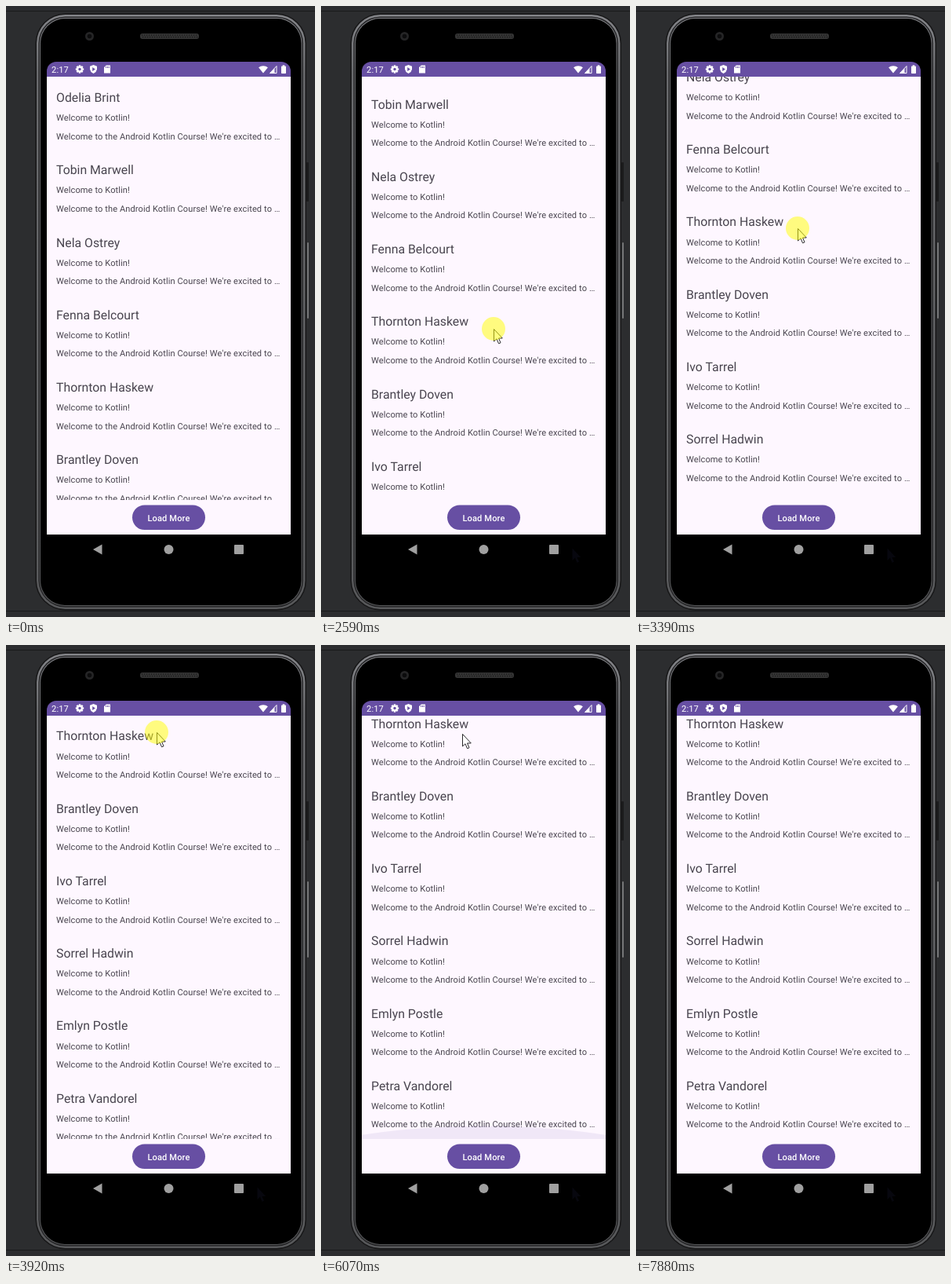
Write an HTML page with a canvas that moves like this. It is 394 px wide and 778 px high and loops after 9.35 s.

```html
<!DOCTYPE html>
<html lang="en">
<head>
<meta charset="utf-8">
<title>Message list</title>
<style>
html, body { margin: 0; width: 100%; height: 100%; overflow: hidden; background: #2c2d2f; }
canvas { display: block; width: 394px; height: 778px; }
</style>
</head>
<body>
<canvas id="stage" width="394" height="778"></canvas>
<script>
const ctx = document.getElementById('stage').getContext('2d');
const LOOP = 9350;
const TICK = 66.8;
const PURPLE = '#674fa3';
const PAPER = '#fef7ff';
const INK = '#49454f';
const ROW = 92.25;
const names = ['Odelia Brint', 'Tobin Marwell', 'Nela Ostrey', 'Fenna Belcourt', 'Thornton Haskew',
  'Brantley Doven', 'Ivo Tarrel', 'Sorrel Hadwin', 'Emlyn Postle', 'Petra Vandorel'];

const smooth = u => u * u * (3 - 2 * u);
const settle = u => 1 - (1 - u) ** 1.5;
const between = (t, a, b) => t >= a && t < b;
const progress = (t, a, b) => Math.min(1, Math.max(0, (t - a) / (b - a)));

// Runs a value through successive moves, each starting where the last one ended.
function glide(t, start, moves) {
  return moves.reduce((value, { from, to, goal, ease }) =>
    value + (goal - value) * ease(progress(t, from, to)), start);
}

const move = (from, to, goal, ease = smooth) => ({ from, to, goal, ease });

const route = [
  { from: 320, to: 520, x: 232, y: 514, ease: settle },
  { from: 2320, to: 3000, x: 209, y: 322, ease: settle },
  { from: 3120, to: 4230, x: 188, y: 64, ease: smooth },
  { from: 4700, to: 5190, x: 178, y: 352, ease: smooth },
  { from: 5330, to: 5800, x: 180, y: 113, ease: settle },
  { from: 6100, to: 6400, x: 199, y: 153, ease: smooth },
  { from: 7560, to: 7830, x: 232, y: 745, ease: smooth }
];
const along = axis => route.map(leg => ({ ...leg, goal: leg[axis] }));
const routeX = along('x'), routeY = along('y');
const scrolling = [move(2360, 3000, 171, settle), move(3131, 4086, 385.4)];

const pointerShown = t => between(t, 315, 7860);
const pressed = t => between(t, 2120, 4500) || between(t, 5320, 5840);

// Overscroll glow: swells while pulled, recedes after release.
const glowAmount = t =>
  Math.sin(progress(t, 5400, 5840) * Math.PI / 2) * (1 - progress(t, 5840, 6440)) ** 2;

function rounded(x, y, w, h, r, fill) {
  ctx.beginPath();
  ctx.roundRect(x, y, w, h, r);
  ctx.fillStyle = fill;
  ctx.fill();
}

function rect(x, y, w, h, fill) {
  ctx.fillStyle = fill;
  ctx.fillRect(x, y, w, h);
}

function disc(x, y, r, fill) {
  ctx.beginPath();
  ctx.arc(x, y, r, 0, Math.PI * 2);
  ctx.fillStyle = fill;
  ctx.fill();
}

function shape(x, y, points, fill, stroke) {
  ctx.beginPath();
  points.forEach(([px, py]) => ctx.lineTo(x + px, y + py));
  ctx.closePath();
  ctx.fillStyle = fill;
  ctx.fill();
  if (stroke) { ctx.strokeStyle = stroke; ctx.lineWidth = 1; ctx.stroke(); }
}

function text(str, x, y, size, color, weight = 400, spacing = 0) {
  ctx.font = `${weight} ${size}px Roboto, sans-serif`;
  ctx.letterSpacing = spacing + 'px';
  ctx.textRendering = 'geometricPrecision';
  ctx.fillStyle = color;
  ctx.fillText(str, x, y);
}

function shell(inset, fill) {
  rounded(37.5 + inset, 9.5 + inset, 345.5 - 2 * inset, 760 - 2 * inset, 38 - inset, fill);
}

function drawPhone() {
  rect(0, 0, 394, 778, '#2c2d2f');
  rect(0, 6, 394, 1, '#191a1b');
  rect(0, 770, 394, 1, '#191a1b');
  rounded(383, 199, 3, 50, 1, '#1b1b1c');
  rounded(384, 301, 2, 97, 1, '#747576');

  const metal = ctx.createLinearGradient(0, 10, 0, 769);
  metal.addColorStop(0, '#85868a');
  metal.addColorStop(0.1, '#6a6b6e');
  metal.addColorStop(1, '#58595b');
  shell(0, '#161617');
  shell(1.5, metal);
  shell(4, '#242426');
  shell(5.5, metal);
  shell(6.5, '#000');

  disc(106.5, 38.5, 5.5, '#252526');
  disc(106.5, 38.5, 2.8, '#0c0c0d');
  rounded(171, 35, 75, 7, 3, '#343434');
  for (let x = 173; x < 245; x += 3) {
    for (let k = 0; k < 2; k++) rect(x + k, 36.5 + k * 2.5, 1.2, 1.2, '#171717');
  }
}

function drawStatus() {
  rounded(52, 71, 311, 19, [12, 12, 0, 0], PURPLE);
  text('2:17', 58, 85, 11.1, '#fff', 400, 0.15);

  for (let i = 0; i < 8; i++) {
    ctx.save();
    ctx.translate(94, 80.5);
    ctx.rotate(i * Math.PI / 4);
    rect(-1.2, -5.2, 2.4, 3, '#fff');
    ctx.restore();
  }
  disc(94, 80.5, 3.9, '#fff');
  disc(94, 80.5, 1.7, PURPLE);

  shape(111.5, 80.5, [[0, -5.5], [4.5, -3.8], [4.5, 0], [3, 3.5], [0, 5.5], [-3, 3.5], [-4.5, 0], [-4.5, -3.8]], '#fff');
  shape(111.5, 80.5, [[-1.3, -2.4], [2.4, 0], [-1.3, 2.4]], PURPLE);

  shape(129, 80.5, [[-1.2, -5], [4, -5], [4, 5], [-4, 5], [-4, -2.2]], '#fff');
  for (let i = 0; i < 3; i++) rect(127.2 + i * 1.8, 77, 0.9, 2, PURPLE);

  ctx.beginPath();
  ctx.moveTo(328, 85.5);
  ctx.arc(328, 85.5, 9.3, -Math.PI * 0.72, -Math.PI * 0.28);
  ctx.fillStyle = '#fff';
  ctx.fill();
  shape(336.5, 85.5, [[0, 0], [8.5, 0], [8.5, -9]], 'transparent', '#fff');
  shape(336.5, 85.5, [[0, 0], [6, 0], [6, -6.3]], '#fff');
  rounded(351, 76.5, 6, 9.5, 0.8, '#fff');
  rect(352.7, 75.3, 2.6, 1.5, '#fff');
}

function drawGlow(amount) {
  ctx.save();
  ctx.globalAlpha = 0.15 * Math.sqrt(amount);
  ctx.translate(207.5, 629);
  ctx.scale(1, -0.84 * amount);
  disc(0, 50 - 373, 373, '#6750a4');
  ctx.restore();
}

function drawList(scroll, glow) {
  rect(52, 90, 311, 583, PAPER);
  ctx.save();
  ctx.beginPath();
  ctx.rect(52, 90, 311, 539);
  ctx.clip();
  names.forEach((name, i) => {
    const y = i * ROW - scroll;
    text(name, 64, y + 122, 15.82, INK);
    text('Welcome to Kotlin!', 64, y + 146.2, 11.08, INK, 400, 0.09);
    text('Welcome to the Android Kotlin Course! We\'re excited to …', 64, y + 169.6, 11.08, INK, 400, 0.09);
  });
  if (glow > 0) drawGlow(glow);
  ctx.restore();
  rounded(161, 635.5, 93, 31.5, 15.75, PURPLE);
  ctx.textAlign = 'center';
  text('Load More', 207.5, 655.6, 11.08, '#fff', 500, 0.1);
  ctx.textAlign = 'left';
}

function drawNav() {
  const grey = '#a0a0a0';
  shape(111, 692, [[0, 0], [11.5, -6.5], [11.5, 6.5]], grey);
  disc(207.5, 692, 6, grey);
  rounded(291, 686, 12, 12, 1, grey);
}

const arrow = [[0.5, 0.5], [0.5, 16], [4, 12.8], [6.5, 18.8], [9, 17.8], [6.5, 12], [11.3, 12]];

function drawPointer(t) {
  if (t >= 385) shape(320, 690, arrow, '#07070e');
  if (!pointerShown(t)) return;
  const x = Math.round(glide(t, 320, routeX));
  const y = Math.round(glide(t, 690, routeY));
  shape(x, y, arrow, '#fff', '#2a282c');
  if (pressed(t)) disc(x, y, 15, 'rgba(255,255,0,0.5)');
}

// The picture advances about 15 times per second.
function quantise(t) {
  const step = Math.floor((t - 313) / TICK + 0.1);
  return Math.max(0, 320 + step * TICK);
}

function frame(now) {
  const t = quantise(now % LOOP);
  drawPhone();
  drawList(glide(t, 0, scrolling), glowAmount(t));
  drawStatus();
  drawNav();
  drawPointer(t);
  requestAnimationFrame(frame);
}
requestAnimationFrame(frame);
</script>
</body>
</html>
```
